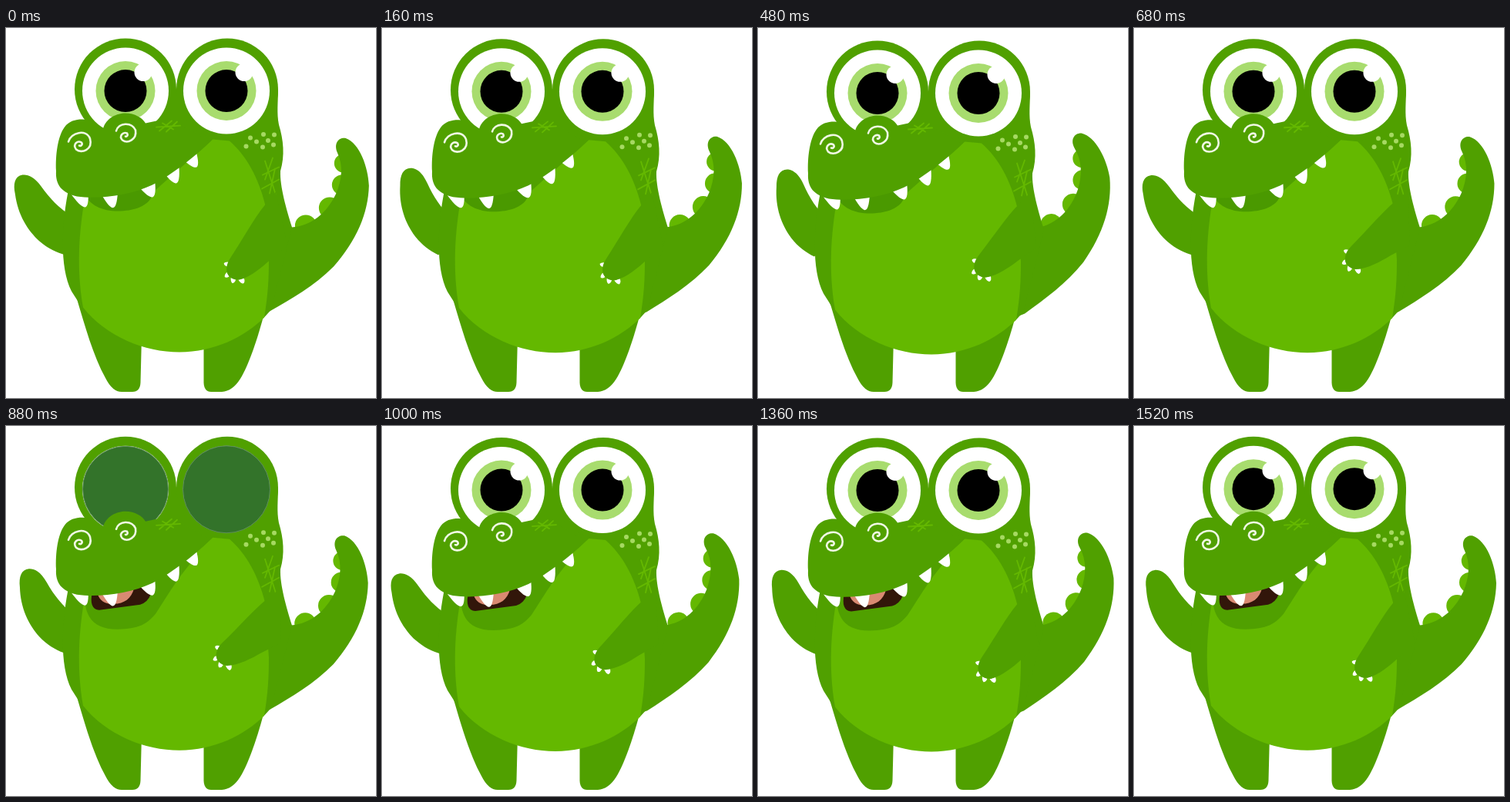
An HTML page for the animation above (1.56 s loop, 480x480 px).

```html
<!DOCTYPE html>
<html lang="en">
<head>
<meta charset="utf-8">
<title>Waving crocodile</title>
<style>
  html, body { margin: 0; width: 100%; height: 100%; overflow: hidden; background: #fff; }
  svg { display: block; width: 100vw; height: 100vh; }
  .skin { fill: #50a000; }
  .light { fill: #64b800; }
  .white { fill: #fff; }
  .line { fill: none; stroke-linecap: round; stroke-linejoin: round; }
</style>
</head>
<body>
<svg viewBox="0 0 480 480">
  <defs>
    <path id="tooth" class="white" d="M-11 -7 C-8 4 -4 14 0 14 S8 4 11 -7Z"/>
    <path id="claw" class="white" d="M-3.500 0 Q-2 5 1 6 Q4 5 3.500 0Z"/>
    <g id="eye">
      <circle class="white" r="56"/>
      <circle r="38.500" fill="#a8dc6e"/>
      <circle r="27.500"/>
      <circle class="white" cx="23" cy="-24" r="11.500"/>
    </g>
  </defs>

  <g class="skin">
    <path d="M90 340 L93 355 C102 385 113 425 129 454 Q138 472 150 472 H164 Q174 472 174.500 460 L176 400 L180 340Z"/>
    <path d="M338 340 L334 374 C326 404 315 437 304 455 Q294 471 280 472 H266 Q257 472 256.500 460 V340Z"/>
  </g>

  <g id="body">
    <g id="tail">
      <g class="light">
        <circle cx="389" cy="256" r="14"/>
        <circle cx="420" cy="233" r="14"/>
        <circle cx="436" cy="203" r="13"/>
        <circle cx="438" cy="175" r="12"/>
      </g>
      <path class="skin" d="M330 260 L371 258 C396 256 416 240 428 215 C436 197 438 178 430 161 C425 149 432 141 441 142.500 C459 149 470 180 471 204 C470 240 455 275 425 309 C400 334 370 351 342 367 L324 372 L320 340Z"/>
    </g>
    <path id="wave" class="skin" d="M84 243 C68 233 56 221 45 206 C35 192 26 190 20 191 C10 193 8 203 11 216 C15 243 28 263 44 277 C55 286 66 291 78 294 L95 270Z"/>

    <path class="skin" d="M82 205 C72 250 69 310 85 341 L92 352 L104 372 L334 376 L344 365 L371 258 C364 235 355 205 356 185 C362 165 360 145 354 125 C351 110 353 95 353 79 H221 L106 112Z"/>
    <g class="skin">
      <circle cx="155" cy="79" r="66"/>
      <circle cx="287" cy="79" r="66"/>
    </g>
    <use href="#eye" x="155" y="81"/>
    <use href="#eye" x="286" y="81"/>
    <g id="lids" fill="#33732a" stroke="#5f8f5c">
      <circle cx="155" cy="81" r="55.500"/>
      <circle cx="286" cy="81.500" r="56.500"/>
    </g>

    <path class="light" d="M102 222 C95 262 91 310 100 362 C130 400 180 420 225 420 C270 420 310 400 335 375 C340 345 341 325 341 300 L336 228 C328 195 312 165 290 146 L268 144 L188 215Z"/>
    <path id="closed" fill="#4a9900" d="M100 212 C108 230 125 237 145 237 C165 237 182 231 188 220 L195 200Z"/>
    <g id="open">
      <path class="skin" d="M102 212 C101 238 106 263 145 263 C172 262 182 257 194 243 C210 219 222 196 250 165 L200 190Z"/>
      <path fill="#32160a" d="M112 214 Q107 237 121 238 L174 231 Q184 228 188 217 L194 198Z"/>
      <path fill="#d98a72" d="M119 217 C121 226 130 231 140 230 C153 230 163 223 166 210Z"/>
    </g>

    <g id="teeth"></g>
    <path class="skin" d="M270 142 C250 163 215 190 190 203 C160 217 120 222 92 218 C72 213 64 203 65 185 C64 165 67 140 76 128 C84 117 98 117 110 119 L126 130 C130 116 144 110 155 110 C167 110 177 116 181 123 L200 119 L222 122 L262 145Z"/>

    <g class="line" stroke="#f0f8e4" stroke-width="2.600">
      <path d="M81 147 C84 135 104 130 109 143 C113 157 98 163 91 157 C86 150 93 145 98 148 C100 151 97 153 95 152"/>
      <path d="M143 133 C146 122 163 121 168 132 C170 144 158 150 151 145 C146 139 152 134 157 136 C159 139 156 141 155 140"/>
    </g>
    <g class="line" stroke="#64b800" stroke-width="1.800">
      <path d="M195 128 L226 126 M199 133 L215 120 M208 134 L222 121 M203 123 L217 131"/>
      <path d="M346 168 L336 196 M349 182 L342 214 M336 172 L350 216 M333 190 L354 180 M332 208 L354 196"/>
    </g>
    <g id="dots" fill="#a6d962"></g>

    <g id="arm">
      <g id="claws"></g>
      <path class="skin" d="M350 212 L336 229 C322 246 308 272 291 298 C281 313 287 327 303 326 C318 322 332 310 343 300 L365 282Z"/>
    </g>
  </g>
</svg>

<script>
const LOOP = 1560, STEP = 40;
const $ = id => document.getElementById(id);
const NS = "http://www.w3.org/2000/svg";

function add(parent, tag, attrs) {
  const el = document.createElementNS(NS, tag);
  for (const k in attrs) el.setAttribute(k, attrs[k]);
  $(parent).appendChild(el);
}
function stamp(parent, id, [x, y, turn, size]) {
  add(parent, "use", { href: "#" + id, transform: `translate(${x} ${y}) rotate(${turn}) scale(${size})` });
}

// x, y, turn, scale
[[98, 218, -21, 1.05], [136, 219, -14, 1], [184, 204, -24, 1.15], [216, 187, -21, 1.05], [240, 168, -32, 1]]
  .forEach(p => stamp("teeth", "tooth", p));
[[288, 306, 115, .9], [288, 319, 60, .9], [295, 324.5, 25, 1], [305, 325, -15, 1.1]]
  .forEach(p => stamp("claws", "claw", p));
[[317, 142], [334, 137.5], [348, 138], [311.5, 153], [325, 147], [333, 154], [347, 151], [340, 145.5]]
  .forEach(([cx, cy]) => add("dots", "circle", { cx, cy, r: 3 }));

// 0 -> 1 -> 0 over one period
const swing = (t, period, delay = 0) => (1 - Math.cos((t - delay) / period * 2 * Math.PI)) / 2;
const rotate = (id, deg, x, y) => $(id).setAttribute("transform", `rotate(${deg.toFixed(3)} ${x} ${y})`);
const show = (id, on) => $(id).style.display = on ? "" : "none";

function draw(t) {
  const bob = .5 + 3.2 * swing(t, LOOP / 2, 25);
  $("body").setAttribute("transform", `translate(0 ${bob.toFixed(3)})`);
  rotate("tail", -6.8 * swing(t, LOOP / 2, 25), 345, 330);
  rotate("wave", 12.5 * swing(t, LOOP / 5, 27), 80, 270);
  rotate("arm", 13 * swing(t, LOOP, 30) ** 2, 367, 243);
  const talking = t >= LOOP / 2;
  show("open", talking);
  show("closed", !talking);
  show("lids", t >= 800 && t < 960);
}

const start = performance.now();
function tick() {
  const t = (performance.now() - start) % LOOP;
  draw(Math.floor(t / STEP) * STEP);
  requestAnimationFrame(tick);
}
tick();
</script>
</body>
</html>
```
